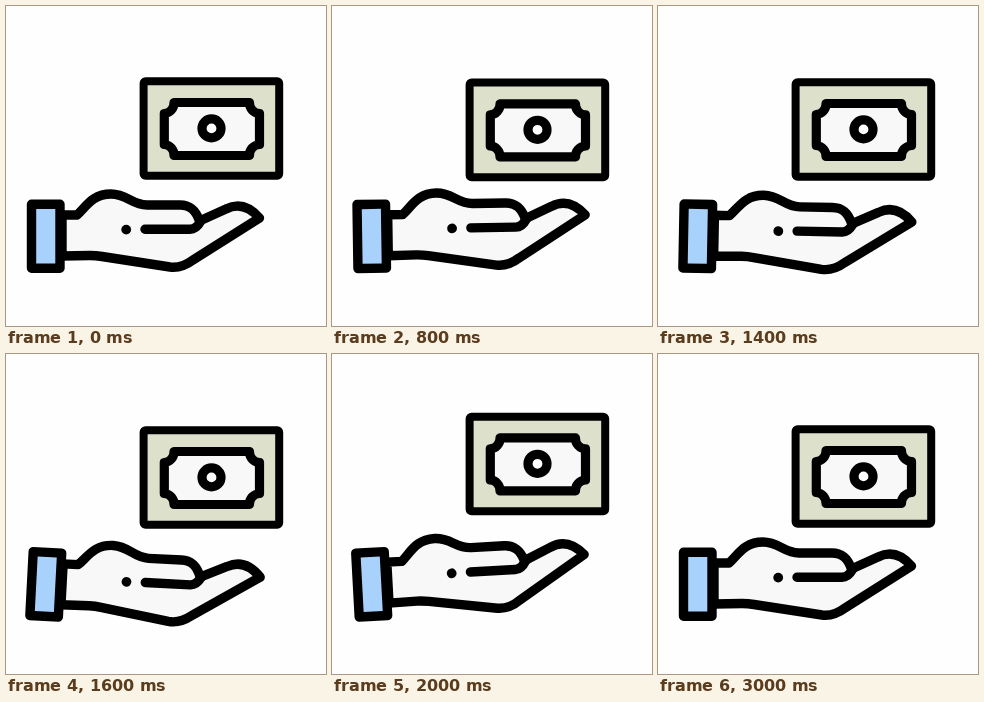
These frames come from a looping animation (320 px wide and 320 px high, 3400 ms). An HTML page with a canvas:

```html
<!DOCTYPE html>
<html lang="en">
<head>
<meta charset="utf-8">
<title>Hand and banknote</title>
<style>
html, body { margin: 0; width: 100%; height: 100%; overflow: hidden; background: #fefefe; }
canvas { display: block; width: 320px; height: 320px; }
</style>
</head>
<body>
<canvas id="stage"></canvas>
<script>
const canvas = document.getElementById('stage');
const ctx = canvas.getContext('2d');
const dpr = window.devicePixelRatio || 1;
canvas.width = canvas.height = 320 * dpr;

const LOOP = 3400, STEP = 200;
const PAPER = '#f8f8f8';

// Key points of the motion: [time in ms, value]
const tiltKeys = [[250, 0], [600, 3], [1000, -4.7], [1600, 3], [1800, -1.2], [2200, -5], [2400, 0]];
const liftKeys = [[0, 0], [600, 1.4], [800, 1.4], [1150, -12], [1400, 1], [1800, 1], [2050, -14], [2500, 0]];

// Value at time t, eased with a half cosine between key points.
function valueAt(keys, t) {
  const next = keys.findIndex(key => key[0] > t);
  if (next < 1) return keys.at(next)[1];
  const [t0, a] = keys[next - 1], [t1, b] = keys[next];
  const p = (t - t0) / (t1 - t0);
  return a + (b - a) * (1 - Math.cos(Math.PI * p)) / 2;
}

const hand = new Path2D(
  'M56 209H71C80 201 86 188 105 188C121 188 126 199 141 199H174' +
  'C185 199 190 205 193.5 215L220 203C231 197.5 242 199 253.5 212' +
  'L187 254C179 260 172 262 164 261L96 250.5Q90 249.5 84 249.5L56 250Z');
const thumb = new Path2D('M139 223.3H184C189 223.3 192 220 194.5 215.5');
const cuff = new Path2D('M25.5 198.3H54V262.3H25.5Z');
const panel = new Path2D(
  'M168 96.5H243.5A10.5 10.5 0 0 0 253.5 107.5V138.5A10.5 10.5 0 0 0 243.5 149.5' +
  'H168A10.5 10.5 0 0 0 158.3 138.5V107.5A10.5 10.5 0 0 0 168 96.5Z');
const note = new Path2D();
note.roundRect(137.6, 75.2, 135.6, 94.6, 2);

function circle(x, y, r) {
  const p = new Path2D();
  p.arc(x, y, r, 0, 2 * Math.PI);
  return p;
}
const seal = circle(205.5, 122.4, 9.5);
const dot = circle(120.2, 223.6, 4.9);

function shape(path, fill, width) {
  ctx.lineWidth = width;
  ctx.fillStyle = fill;
  ctx.fill(path);
  ctx.stroke(path);
}

function drawNote(lift) {
  ctx.save();
  ctx.translate(0, lift);
  shape(note, '#dde0ca', 8);
  shape(panel, PAPER, 9.2);
  shape(seal, '#fefefe', 9.2);
  ctx.restore();
}

function drawHand(tilt) {
  ctx.save();
  ctx.translate(40, 231);
  ctx.rotate(tilt * Math.PI / 180);
  ctx.translate(-40, -231);
  shape(hand, PAPER, 9.4);
  ctx.stroke(thumb);
  ctx.fillStyle = '#000';
  ctx.fill(dot);
  shape(cuff, '#a8d2fc', 9.4);
  ctx.restore();
}

function draw(now) {
  const t = Math.min(Math.floor(now % LOOP / STEP) * STEP, 3000);
  ctx.setTransform(dpr, 0, 0, dpr, 0, 0);
  ctx.fillStyle = '#fefefe';
  ctx.fillRect(0, 0, 320, 320);
  ctx.strokeStyle = '#000';
  ctx.lineJoin = ctx.lineCap = 'round';
  drawNote(valueAt(liftKeys, t));
  drawHand(valueAt(tiltKeys, t));
}

const start = performance.now();
function tick() {
  draw(performance.now() - start);
  requestAnimationFrame(tick);
}
tick();
</script>
</body>
</html>
```
